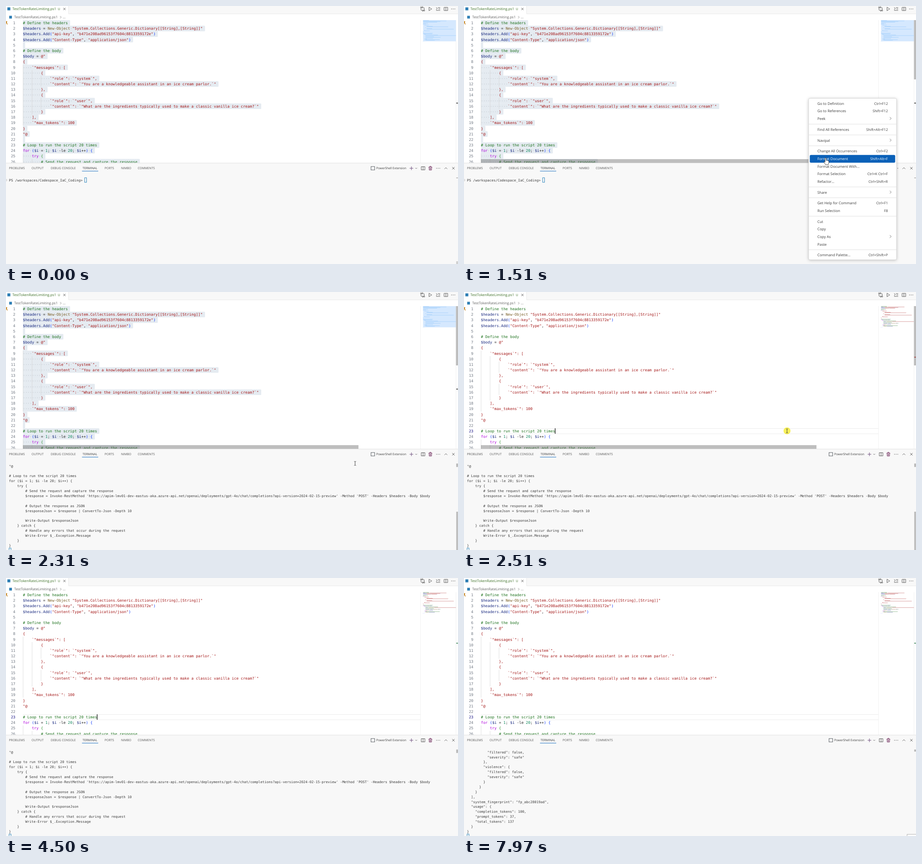
Recreate the animation shown at these times as an HTML page. Size 990 by 566 pixels, loop 8000 ms.

```html
<!DOCTYPE html>
<html lang="en">
<head>
<meta charset="utf-8">
<title>Editor session</title>
<style>
html, body { margin: 0; width: 990px; height: 566px; overflow: hidden; background: #fff; }
svg { display: block; }
text { white-space: pre; text-rendering: geometricPrecision; }
.mono { font-family: "DejaVu Sans Mono", monospace; }
.ui { font-family: "Open Sans", "Noto Sans", sans-serif; }
</style>
</head>
<body>
<svg id="stage" width="990" height="566" viewBox="0 0 990 566">
  <defs><clipPath id="pane"><rect x="0" y="31" width="990" height="313"/></clipPath></defs>
</svg>
<script>
const NS = 'http://www.w3.org/2000/svg';
const stage = document.getElementById('stage');

function el(parent, tag, attrs = {}, content) {
  const node = document.createElementNS(NS, tag);
  for (const k in attrs) node.setAttribute(k, attrs[k]);
  if (content !== undefined) node.textContent = content;
  return parent.appendChild(node);
}
const group = (parent, attrs) => el(parent, 'g', attrs);
const rect = (p, x, y, width, height, fill, more) => el(p, 'rect', { x, y, width, height, fill, ...more });
const line = (p, d, stroke, width = 0.8) =>
  el(p, 'path', { d, stroke, fill: 'none', 'stroke-width': width, 'stroke-linejoin': 'round' });
const label = (p, x, y, size, fill, str, anchor = 'start') =>
  el(p, 'text', { class: 'ui', x, y, 'font-size': size, fill, 'text-anchor': anchor }, str);
const mono = (p, x, y, size, fill, str, anchor = 'start') =>
  el(p, 'text', { class: 'mono', x, y, 'font-size': size, fill, 'text-anchor': anchor }, str);

const CODE = `# Define the headers
$headers = New-Object "System.Collections.Generic.Dictionary[[String],[String]]"
$headers.Add("api-key", "b471e208ad96153f7604c8813359172e")
$headers.Add("Content-Type", "application/json")

# Define the body
$body = @"
{
    \`"messages\`": [
        {
            \`"role\`": \`"system\`",
            \`"content\`": \`"You are a knowledgeable assistant in an ice cream parlor.\`"
        },
        {
            \`"role\`": \`"user\`",
            \`"content\`": \`"What are the ingredients typically used to make a classic vanilla ice cream?\`"
        }
    ],
    \`"max_tokens\`": 100
}
"@
`.split('\n');

const LOOP = `
# Loop to run the script 20 times
for ($i = 1; $i -le 20; $i++) {
    try {
        # Send the request and capture the response
        $response = Invoke-RestMethod 'https://apim-lmv01-dev-eastus-aka.azure-api.net/openai/deployments/gpt-4o/chat/completions?api-version=2024-02-15-preview' -Method 'POST' -Headers $headers -Body $body

        # Output the response as JSON
        $responseJson = $response | ConvertTo-Json -Depth 10

        Write-Output $responseJson
    } catch {
        # Handle any errors that occur during the request
        Write-Error $_.Exception.Message
    }
}`.split('\n');

const REPLY = `          "filtered": false,
          "severity": "safe"
        },
        "violence": {
          "filtered": false,
          "severity": "safe"
        }
      }
    }
  ],
  "system_fingerprint": "fp_abc28019ad",
  "usage": {
    "completion_tokens": 100,
    "prompt_tokens": 37,
    "total_tokens": 137
  }
}`.split('\n');

const ALL = CODE.concat(LOOP.slice(1));
const LEFT = 37, TOP = 31, ROW = 12.18, CHAR = 4.925, SIZE = 8.18;
const INK = '#3b3b3b', RED = '#a31515', GREEN = '#1a701a', NAVY = '#1a2a80';

// Split one row into [column, text, colour]; rows 8 to 21 are one long string.
function tokens(src, n) {
  const start = src.search(/\S/);
  if (start < 0) return [];
  if (n >= 8 && n <= 21) return [[start, src.slice(start), RED]];
  const rules = /(#.*)|(@?"[^"]*"?|'[^']*')|(\$\w+(?:\.\w+)*)|(\b(?:for|try|catch)\b)|(\b[A-Z]\w+-\w+)|(\b\d+)|([(){}])|([^\s$"'#(){}]+)/g;
  const colours = [GREEN, RED, NAVY, '#af00db', '#795e26', '#098658', n === 25 ? '#319331' : '#0431fa', '#222'];
  return [...src.matchAll(rules)].map(m => [m.index, m[0], colours[m.slice(1).findIndex(Boolean)]]);
}

// ---- title row and breadcrumb
rect(stage, 0, 0, 990, 566, '#fff');
rect(stage, 137, 0, 853, 17.5, '#f8f8f8');
line(stage, 'M137 0V17.2H990', '#e5e5e5');
rect(stage, 3, 3, 6.5, 6.5, '#2f7fb5');
label(stage, 14, 9.3, 7.75, '#3d7027', 'TestTokenRateLimiting.ps1');
label(stage, 113.5, 9.2, 7, '#3d7027', 'U');
line(stage, 'M125.5 4l5 5m0-5l-5 5', INK);
rect(stage, 7, 21.5, 6, 6, '#2f7fb5');
label(stage, 18, 27.3, 7.7, '#616161', 'TestTokenRateLimiting.ps1');
line(stage, 'M118.5 22l2.5 2.6-2.5 2.6', '#616161', 0.7);
label(stage, 124.5, 27.3, 7.7, '#616161', '...');

const dots = (p, x, y) => [-3.5, 0, 3.5].forEach(d => el(p, 'circle', { cx: x + d, cy: y, r: 0.7, fill: INK }));
const split = (p, x, y) => line(p, `M${x - 4} ${y - 3.5}h8v7h-8zM${x} ${y - 3.5}v7`, INK);
line(stage, 'M909 4v4q0 2 2.5 2h3M912 8l2.3 2-2.3 2M916 9V5q0-2-2.5-2h-3M913 1l-2.3 2 2.3 2', INK);
el(stage, 'circle', { cx: 909, cy: 3, r: 1.2, fill: 'none', stroke: INK, 'stroke-width': 0.7 });
el(stage, 'circle', { cx: 916, cy: 10, r: 1.2, fill: 'none', stroke: INK, 'stroke-width': 0.7 });
line(stage, 'M926.5 2.7l6 3.8-6 3.8z', INK);
line(stage, 'M942 3l3 2.5-3 2.5M946 3.5h5M947 6.5h4M942 9.7h9', INK);
split(stage, 963.5, 6.5);
dots(stage, 979.5, 6.5);

// ---- editor
const pane = group(stage, { 'clip-path': 'url(#pane)' });
const selection = group(pane);
const current = group(pane);
rect(current, 37, 299, 871, 1, '#ececec');
rect(current, 37, 310.5, 871, 1, '#ececec');

function guide(col, from, to) {
  const x = LEFT + col * CHAR + 0.4;
  line(pane, `M${x} ${TOP + (from - 1) * ROW}V${TOP + to * ROW}`, '#d3d3d3', 0.7);
}
guide(0, 9, 19); guide(4, 10, 17); guide(8, 11, 12); guide(8, 15, 16);
guide(0, 25, 26); guide(4, 26, 26);

let lineNo;
ALL.slice(0, 26).forEach((src, i) => {
  const y = TOP + i * ROW, base = y + 9.1;
  rect(selection, LEFT, y, (src.length + 1) * CHAR, ROW + 0.15, '#e5ebf1', { rx: 1.5 });
  mono(selection, LEFT, base, SIZE, '#b4bcc4', src.replace(/\S/g, '\u00a0').replace(/ /g, '·'));
  const num = mono(pane, 20.5, base, SIZE, '#6e7681', i + 1, 'end');
  if (i === 22) lineNo = num;
  for (const [col, str, fill] of tokens(src, i + 1)) mono(pane, LEFT + col * CHAR, base, SIZE, fill, str);
});
const caret = rect(pane, 199, 299, 1.2, 12, '#000');
el(pane, 'path', { d: 'M0 33l3 1-1.2 2.5 2 3.5-1.2.8-2.6-3.6z', fill: '#c98a2b' });

// ---- minimap and rulers
line(pane, 'M907.8 31V344M985.6 31V344', '#ececec', 0.8);
const mapSel = group(pane), mapText = group(pane);
rect(mapSel, 913.5, 31, 72, 46.5, '#d5e8fe');
ALL.forEach((src, i) => {
  const start = Math.max(0, src.search(/\S/)), y = 31.2 + i * 1.28;
  const width = Math.min(72 - start * 0.64, (src.length - start) * 0.64);
  if (width <= 0) return;
  rect(mapSel, 913.5 + start * 0.64, y, width, 0.9, '#a9d2fb');
  for (const [col, str, fill] of tokens(src, i + 1)) {
    const w = Math.min(str.length * 0.64, 72 - col * 0.64);
    if (w > 0) rect(mapText, 913.5 + col * 0.64, y, w, 0.8, fill, { opacity: 0.5 });
  }
});
const vBar = rect(pane, 985.5, 31, 4.5, 130, '#bdbdbd');
const hBar = rect(pane, 37, 336, 735, 8, '#646464', { 'fill-opacity': 0.42 });
const oldMark = rect(pane, 986, 212.3, 4, 1.4, '#222');
const newMark = rect(pane, 986, 142.3, 4, 1.4, '#2b7a4b');

// ---- panel
rect(stage, 0, 344.2, 990, 222, '#f8f8f8');
line(stage, 'M0 344.5H990', '#dedede');
[['PROBLEMS', 6.5], ['OUTPUT', 56], ['DEBUG CONSOLE', 98], ['TERMINAL', 167.8], ['PORTS', 216], ['NIMBO', 252], ['COMMENTS', 288.5]]
  .forEach(([name, x]) => label(stage, x, 358.4, 6.7, name === 'TERMINAL' ? INK : '#555', name));
rect(stage, 166.5, 361.7, 35.5, 0.9, '#005fb8');
rect(stage, 799.5, 352.2, 8, 7.5, 'none', { stroke: '#4b5157', 'stroke-width': 0.9 });
label(stage, 811, 358.4, 6.6, INK, 'PowerShell Extension');
line(stage, 'M884 356h8M888 352v8', '#5d3a70', 0.9);
line(stage, 'M896.5 355l2 2 2-2', INK, 0.7);
split(stage, 913.5, 356);
line(stage, 'M925.5 353.5h8M928 353v-1.3h3v1.3M926.5 354l.5 6h5l.5-6M928.7 355v4M930.3 355v4', '#6b2557', 0.9);
dots(stage, 946.5, 356);
line(stage, 'M960.5 357.5l3-3 3 3M977.3 353.3l5.2 5.2m0-5.2l-5.2 5.2', INK);

const TERM = 6.5, PITCH = 10.89;
const termRows = rows => {
  const g = group(stage);
  rows.forEach((src, i) => {
    const start = src.search(/\S/);
    if (start >= 0) mono(g, TERM + start * 4.479, 384.7 + i * PITCH, 7.44, '#3b3b3b', src.slice(start));
  });
  return g;
};
const cursorBox = (g, x, y) => rect(g, x, y, 4.2, 10, 'none', { stroke: '#1c7cb8', 'stroke-width': 0.9 });

const prompt = termRows(['PS /workspaces/Codespace_IaC_Coding>']);
el(prompt, 'circle', { cx: 0, cy: 382, r: 2, fill: 'none', stroke: '#aaa', 'stroke-width': 0.7 });
cursorBox(prompt, 172.2, 376.8);
rect(prompt, 986, 376.3, 4, 1.6, '#b5b5b5');
const tail = rect(stage, 986, 560, 4, 6, '#d0d0d0');

const echo = termRows(['"@', ...LOOP]);
cursorBox(echo, 6.8, 561.8);
rect(echo, 986, 376.3, 4, 7.5, '#bcbcbc');
const reply = termRows(REPLY);
cursorBox(reply, 6.8, 561.8);
rect(reply, 986, 376.3, 4, 4.5, '#bcbcbc');
const echoBar = rect(stage, 986, 482, 4, 84, '#c0c0c0');
const replyBar = rect(stage, 986, 539, 4, 23, '#c0c0c0');
const popup = rect(stage, 970.5, 562.3, 24, 10, '#fff', { stroke: '#a9a9a9', 'stroke-width': 0.9 });

// ---- context menu; '-' draws a separator, '>' a submenu arrow
const MENU = ['Go to Definition|Ctrl+F12', 'Go to References|Shift+F12', 'Peek|>', '-', 'Find All References|Shift+Alt+F12', '-',
  'Navipal|>', '-', 'Change All Occurrences|Ctrl+F2', 'Format Document|Shift+Alt+F', 'Format Document With...|',
  'Format Selection|Ctrl+K Ctrl+F', 'Refactor...|Ctrl+Shift+R', '-', 'Share|>', '-', 'Get Help for Command|Ctrl+F1',
  'Run Selection|F8', '-', 'Cut|', 'Copy|', 'Copy As|>', 'Paste|', '-', 'Command Palette...|Ctrl+Shift+P'];
const menu = group(stage);
rect(menu, 754.8, 202.5, 192.6, 354.3, '#fff', {
  rx: 3.2, stroke: '#cecece', 'stroke-width': 0.8, style: 'filter: drop-shadow(0 1px 3px rgba(0,0,0,.22))' });
const items = [];
let itemY = 214;
for (const entry of MENU) {
  if (entry === '-') {
    line(menu, `M755 ${itemY - 4.7}H947`, '#d4d4d4', 0.7);
    itemY += 7.2;
    continue;
  }
  const [name, key] = entry.split('|');
  const hover = rect(menu, 757.4, itemY - 8.5, 187, 17, '#0a60b8', { rx: 2.5 });
  const parts = [label(menu, 774, itemY + 2.8, 7.9, INK, name)];
  if (key === '>') line(menu, `M932.7 ${itemY - 3.5}l3 3-3 3`, INK, 0.7);
  else parts.push(label(menu, 928.3, itemY + 2.8, 7.7, INK, key, 'end'));
  items.push({ y: itemY, hover, parts });
  itemY += 16.6;
}

// ---- pointer
const ring = el(stage, 'circle', { r: 7.6, fill: '#f5ea1c', 'fill-opacity': 0.72 });
const pointer = group(stage);
const beam = line(pointer, 'M-2-4.5q2 0 2 1.2V3.3q0 1.2-2 1.2M2-4.5q-2 0-2 1.2M0 3.3q0 1.2 2 1.2', '#333', 0.9);
const hand = el(pointer, 'path', {
  d: 'M-1.5-2.5q1.2-1.2 2.4 0V3l1-.8 1.3.6 1.3-.1 1.3 1 .9.3v4l-1.2 4h-6l-3.2-5.2q-.8-1.6 1-1.6l1.2 1.3z',
  fill: '#fff', stroke: '#222', 'stroke-width': 0.8 });

const PATH = [[170, 1000, 470], [770, 755, 201], [1100, 755, 202], [1170, 760, 217], [1840, 823, 449],
  [2180, 823, 449], [2440, 707.5, 304.7], [2760, 707.5, 304.7], [3340, 1000, 535]];

const within = (t, a, b) => t >= a && t < b;
const ramp = (t, a, b) => Math.min(1, Math.max(0, (t - a) / (b - a)));
const smooth = u => u * u * (3 - 2 * u);
const show = (node, on) => node.setAttribute('opacity', Number(on));

function place(t) {
  let [, x, y] = PATH[0];
  for (let i = 1; i < PATH.length; i++) {
    const [t0, x0, y0] = PATH[i - 1], [t1, x1, y1] = PATH[i];
    if (t < t0) break;
    const u = smooth(ramp(t, t0, t1));
    x = x0 + (x1 - x0) * u;
    y = y0 + (y1 - y0) * u;
  }
  return [x, y];
}

const BLINK = [2480, 3000, 3500, 4040, 4500, 4990, 5510, 5990, 6540, 6970, 7510, 7970];

function render(t) {
  const [x, y] = place(t), open = within(t, 910, 2180), clicked = t >= 2480;
  pointer.setAttribute('transform', `translate(${x} ${y})`);
  show(pointer, within(t, 170, 3340));
  show(beam, !open);
  show(hand, open);
  ring.setAttribute('cx', x);
  ring.setAttribute('cy', y);
  show(ring, within(t, 740, 910) || within(t, 2110, 2180) || (clicked && 1 - ramp(t, 2580, 2720)));

  show(menu, open);
  for (const { y: cy, hover, parts } of items) {
    const on = t >= 1170 && Math.abs(y - cy) < 8.3;
    show(hover, on);
    parts.forEach(p => p.setAttribute('fill', on ? '#fff' : INK));
  }

  show(selection, !clicked);
  show(mapSel, !clicked);
  show(mapText, clicked);
  show(current, clicked);
  show(oldMark, !clicked);
  show(newMark, clicked);
  newMark.setAttribute('fill', t < 2950 ? '#a33a3a' : '#2b7a4b');
  lineNo.setAttribute('fill', clicked ? '#171184' : '#6e7681');
  show(caret, BLINK.filter(b => b <= t).length % 2);

  const fadeIn = ramp(t, 430, 560);
  show(vBar, fadeIn * (1 - ramp(t, 2780, 2910)));
  show(hBar, fadeIn * (1 - ramp(t, 3000, 3570)));

  show(prompt, t < 2310);
  show(tail, t < 770);
  show(echo, within(t, 2310, 5780));
  show(echoBar, within(t, 2310, 5780) && 1 - ramp(t, 3300, 3840));
  show(reply, t >= 5780);
  show(replyBar, t >= 5780 && 1 - ramp(t, 6500, 6770));
  show(popup, t >= 4910);
}

function tick() {
  render(performance.now() % 8000);
  requestAnimationFrame(tick);
}
tick();
</script>
</body>
</html>
```
